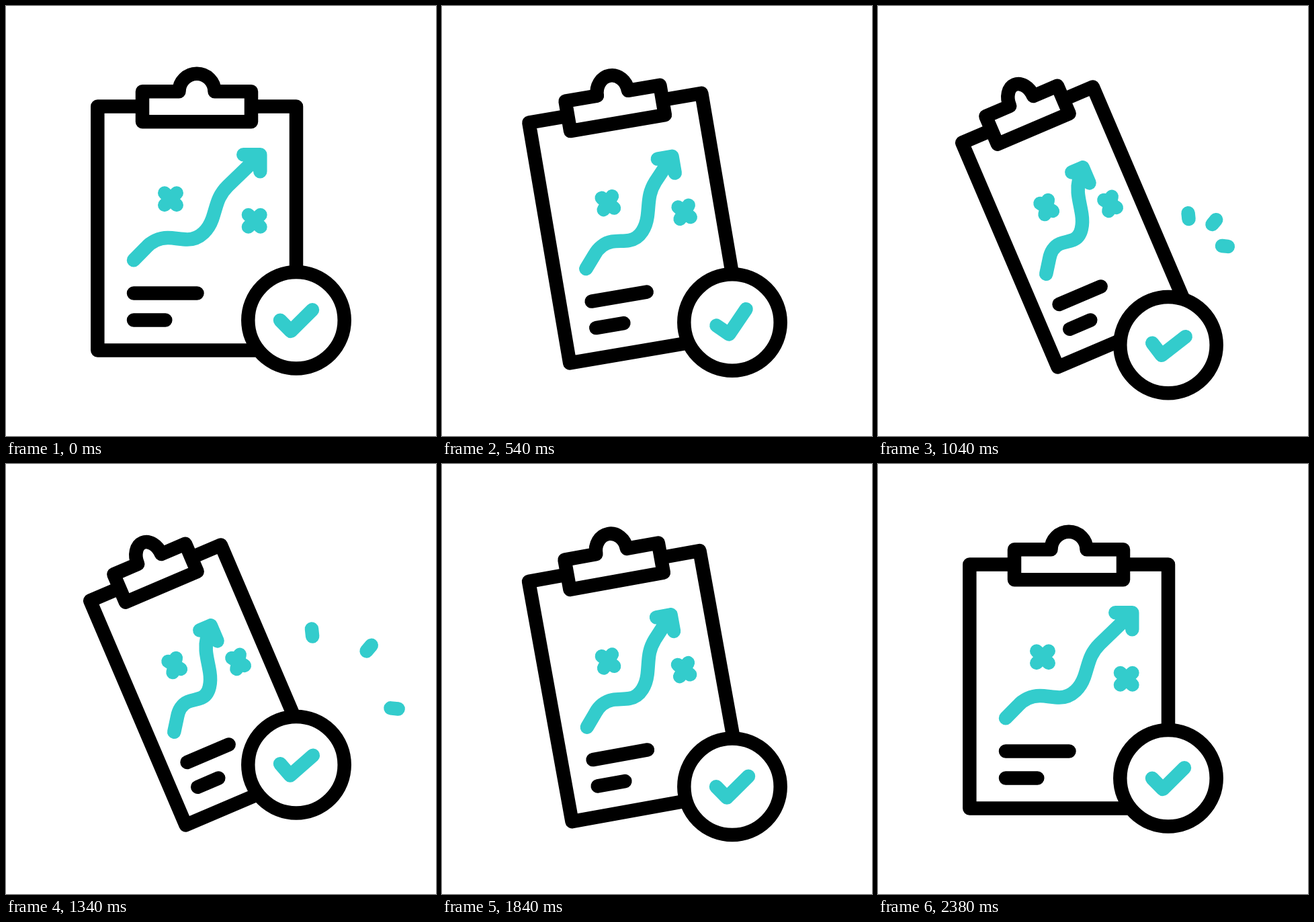
An HTML page with a canvas for the animation above (2400 ms loop, 640x640 px).

```html
<!DOCTYPE html>
<html lang="en">
<head>
<meta charset="utf-8">
<title>Clipboard</title>
<style>
  html, body { margin: 0; width: 100%; height: 100%; overflow: hidden; background: #fff; }
  canvas { display: block; width: 640px; height: 640px; }
</style>
</head>
<body>
<canvas id="stage" width="640" height="640"></canvas>
<script>
const ctx = document.getElementById('stage').getContext('2d');
const LOOP = 2400;
const BLACK = '#000', CYAN = '#33cccc', WHITE = '#fff';
const LINE = 20.5;
const PIVOT = { x: 283.5, y: 306.2 };
const BADGE = { x: 432, y: 467.7, radius: 71.7 };
const MAX_TILT = 23.1;
const BOUNCE = 363; // half a period of the badge's bounce, in ms

// Eased progress from 0 to 1 between two times
function ramp(t, from, to) {
  const u = Math.min(1, Math.max(0, (t - from) / (to - from)));
  return (1 - Math.cos(Math.PI * u)) / 2;
}

const radians = degrees => degrees * Math.PI / 180;

const tiltAt = t => MAX_TILT * (ramp(t, 200, 960) - ramp(t, 1428, 2196));

const checkTurnAt = t =>
  -19 * ramp(t, 0, 380) + 27 * ramp(t, 380, 820) - 8 * ramp(t, 820, 1800);

// One eased drop, then a steady bounce that dies away
function badgeOffsetAt(t) {
  if (t < BOUNCE) return 40.3 * ramp(t, 0, BOUNCE);
  const swing = 1.8 - 38.5 * Math.cos(Math.PI * t / BOUNCE);
  return swing * (1 - ramp(t, 4 * BOUNCE, 2080));
}

// Builds the path under a transform, then strokes it with an unscaled pen
function draw(path, color, { width = LINE, fill, place } = {}) {
  ctx.save();
  if (place) place();
  ctx.beginPath();
  path();
  ctx.restore();
  if (fill) {
    ctx.fillStyle = fill;
    ctx.fill();
  }
  ctx.strokeStyle = color;
  ctx.lineWidth = width;
  ctx.stroke();
}

function line(x0, y0, x1, y1) {
  ctx.moveTo(x0, y0);
  ctx.lineTo(x1, y1);
}

function clip() {
  const left = 203, right = 365, top = 127.3, bottom = 172.3;
  ctx.moveTo(left, bottom);
  ctx.lineTo(left, top);
  ctx.arc(284, top, 26.5, Math.PI, 0);
  ctx.lineTo(right, top);
  ctx.lineTo(right, bottom);
  ctx.closePath();
}

function bars() {
  line(190, 427.5, 284.5, 427.5);
  line(190, 467.5, 237.3, 467.5);
}

function cross(x, y, arm = 9) {
  line(x - arm, y - arm, x + arm, y + arm);
  line(x + arm, y - arm, x - arm, y + arm);
}

// The arrow tip slides back along its shaft by the given amount
function chart(pull) {
  const x = 378.3 - pull, y = 221.3 + 1.04 * pull, barb = 25;
  line(190, 378.3, 208, 360);
  ctx.bezierCurveTo(216, 351, 228, 345, 241, 345);
  ctx.bezierCurveTo(251, 345, 260, 347.5, 270, 347.5);
  ctx.bezierCurveTo(290, 347.5, 302, 331, 307, 317);
  ctx.bezierCurveTo(314, 297, 314, 284, 330, 268);
  ctx.lineTo(x, y);
  line(x - barb, y, x, y);
  ctx.lineTo(x, y + barb);
}

function drawClipboard(t) {
  const tilt = tiltAt(t);
  const place = () => {
    ctx.translate(PIVOT.x, PIVOT.y);
    ctx.rotate(-radians(tilt));
    ctx.scale(1 - 0.0123 * tilt, 1);
    ctx.translate(-PIVOT.x, -PIVOT.y);
  };
  draw(() => ctx.rect(136.3, 149.6, 295.7, 363), BLACK, { place });
  draw(clip, BLACK, { place, fill: WHITE });
  draw(bars, BLACK, { place });
  draw(() => chart(1.36 * tilt), CYAN, { place });
  draw(() => { cross(245, 287.2); cross(369.7, 319.7); }, CYAN, { place, width: 20 });
}

function drawBadge(t) {
  const place = () => ctx.translate(BADGE.x, BADGE.y + badgeOffsetAt(t));
  draw(() => ctx.arc(0, 0, BADGE.radius, 0, 2 * Math.PI), BLACK, { place, fill: WHITE });
  const check = () => {
    line(-24, 0, -8, 16.3);
    ctx.lineTo(24, -15.5);
  };
  draw(check, CYAN, {
    place() {
      place();
      ctx.rotate(radians(checkTurnAt(t)));
    }
  });
}

function drawRay(x, y, degrees, tail, head) {
  const dx = Math.cos(radians(degrees)), dy = Math.sin(radians(degrees));
  draw(() => line(x + dx * tail, y + dy * tail, x + dx * head, y + dy * head), CYAN);
}

function drawRays(t) {
  const reach = 72;
  const head = reach * ramp(t, 970, 1276), tail = reach * ramp(t, 1110, 1420);
  if (head - tail < 0.1) return;
  drawRay(462.5, 317, -96, tail, head);
  drawRay(497.5, 325, -50, tail, head);
  drawRay(512, 357, 6, tail, head);
}

function render(now) {
  const t = now % LOOP;
  ctx.fillStyle = WHITE;
  ctx.fillRect(0, 0, 640, 640);
  ctx.lineCap = ctx.lineJoin = 'round';
  drawClipboard(t);
  drawBadge(t);
  drawRays(t);
}

let start;
function frame(now) {
  start ??= now;
  render(now - start);
  requestAnimationFrame(frame);
}
render(0);
requestAnimationFrame(frame);
</script>
</body>
</html>
```
